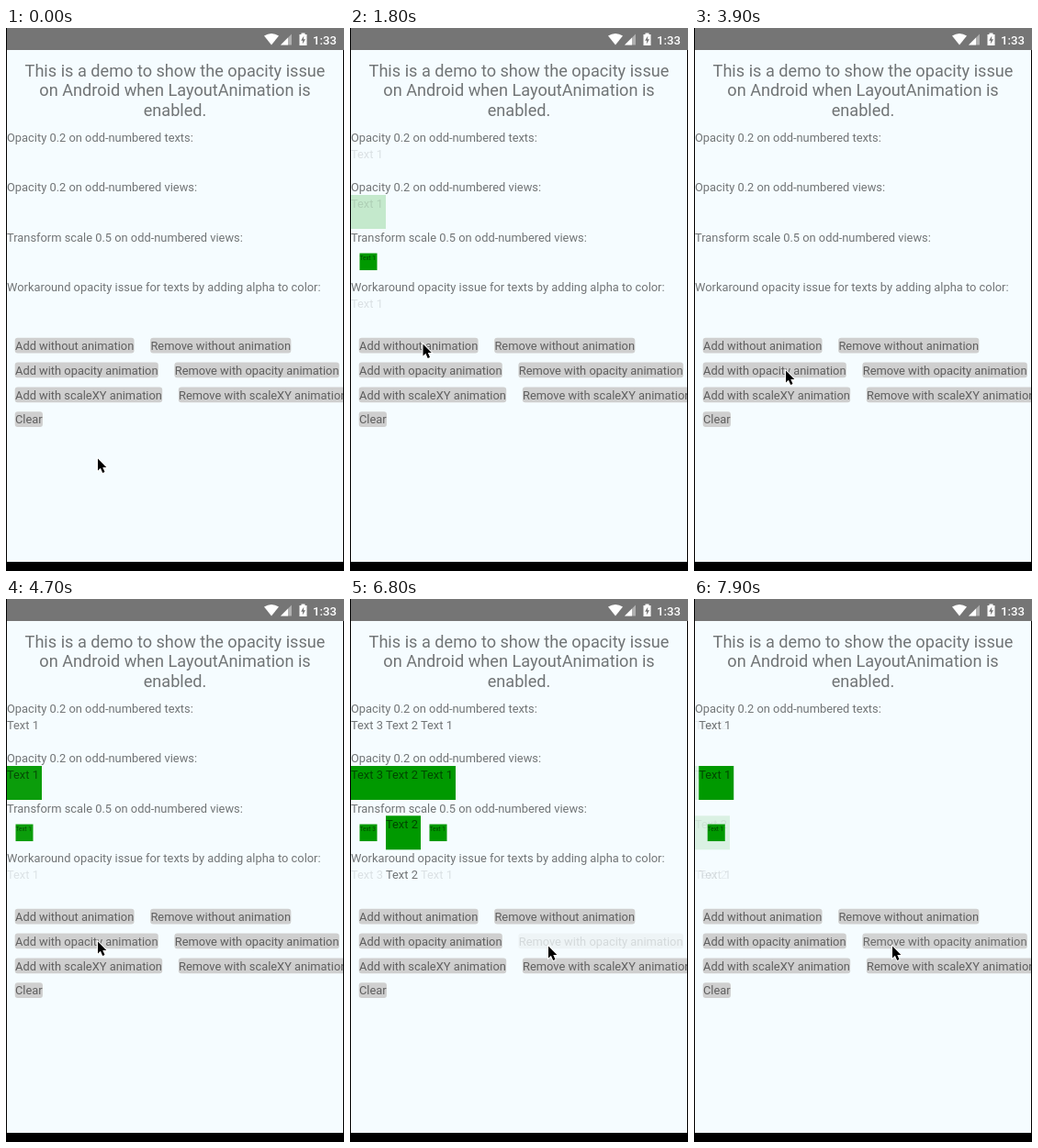
These frames come from a looping animation (368 px wide and 592 px high, 8000 ms). An HTML page with a canvas:

```html
<!DOCTYPE html>
<html lang="en">
<head>
<meta charset="utf-8">
<title>Opacity demo</title>
<style>
  html, body { margin: 0; width: 100%; height: 100%; overflow: hidden; background: #f5fcff; }
  canvas { display: block; width: 368px; height: 592px; }
</style>
</head>
<body>
<canvas></canvas>
<script>
const W = 368, H = 592, LOOP = 8000, STEP = 100, FADE = 300;
const INK = 'rgba(0,0,0,.54)', GREEN = '#009900', SLOT = 38;
const BODY = '12.86px Roboto, sans-serif';
const TITLE = '18.15px Roboto, sans-serif';
const CLOCK = '500 13.2px Roboto, sans-serif';

const canvas = document.querySelector('canvas');
const ctx = canvas.getContext('2d');
const ratio = window.devicePixelRatio || 1;
canvas.width = W * ratio;
canvas.height = H * ratio;

const titleLines = [
  'This is a demo to show the opacity issue',
  'on Android when LayoutAnimation is',
  'enabled.'
];
const labels = [
  'Opacity 0.2 on odd-numbered texts:',
  'Opacity 0.2 on odd-numbered views:',
  'Transform scale 0.5 on odd-numbered views:',
  'Workaround opacity issue for texts by adding alpha to color:'
];
const buttonRows = [
  ['Add without animation', 'Remove without animation'],
  ['Add with opacity animation', 'Remove with opacity animation'],
  ['Add with scaleXY animation', 'Remove with scaleXY animation'],
  ['Clear']
];

// Lifetimes in ms; faded items lose their own opacity.
const items = [
  { n: 3, born: 2250, died: 2650 },
  { n: 2, born: 1950, died: 3010 },
  { n: 1, born: 1350, died: 3300 },
  { n: 3, born: 6090, died: 7020, fade: true },
  { n: 2, born: 5190, died: 7665, fade: true },
  { n: 1, born: 4440, died: Infinity, fade: true }
];
const presses = [
  ['Add without animation', 1250, 1350],
  ['Add without animation', 1850, 1950],
  ['Add without animation', 2130, 2250],
  ['Remove without animation', 2500, 2650],
  ['Remove without animation', 2770, 2980],
  ['Remove without animation', 3150, 3300],
  ['Add with opacity animation', 4250, 4440],
  ['Add with opacity animation', 4860, 5190],
  ['Add with opacity animation', 5770, 6090],
  ['Remove with opacity animation', 6700, 7020],
  ['Remove with opacity animation', 7480, 7665]
];
// Pointer stops: [time, x, y]
const pointerPath = [
  [0, 99.5, 469], [200, 99.5, 469], [900, 79, 344], [2260, 79, 344],
  [2500, 189, 340], [3310, 189, 340], [3600, 99.5, 373],
  [6150, 99.5, 373], [6600, 215.5, 378], [LOOP, 215.5, 378]
];

const clamp = v => Math.min(1, Math.max(0, v));
const ease = v => (1 - Math.cos(Math.PI * clamp(v))) / 2;

function presence(item, t) {
  if (!item.fade) return t >= item.born && t < item.died ? 1 : 0;
  return ease((t - item.born) / FADE) * (1 - ease((t - item.died) / FADE));
}

function pressOpacity(name, t) {
  const last = presses.filter(p => p[0] === name && p[1] <= t).pop();
  if (!last) return 1;
  const [, down, up] = last;
  return t < up ? 1 - 0.8 * clamp((t - down) / 100) : 0.2 + 0.8 * ease((t - up) / FADE);
}

function text(str, x, y, font = BODY, color = INK, align = 'left') {
  ctx.font = font;
  ctx.fillStyle = color;
  ctx.textAlign = align;
  ctx.fillText(str, x, y);
}

function rect(x, y, w, h, color) {
  ctx.fillStyle = color;
  ctx.fillRect(x, y, w, h);
}

function shape(points, color) {
  ctx.fillStyle = color;
  ctx.beginPath();
  points.forEach(([x, y]) => ctx.lineTo(x, y));
  ctx.closePath();
  ctx.fill();
}

function statusBar() {
  rect(0, 0, W, 24, '#757575');
  ctx.fillStyle = '#fff';
  ctx.beginPath();
  ctx.moveTo(289, 18.5);
  ctx.lineTo(281, 8.6);
  ctx.quadraticCurveTo(289, 3.4, 297, 8.6);
  ctx.closePath();
  ctx.fill();
  shape([[299, 18.5], [311, 18.5], [311, 6.5]], '#b0b0b0');
  shape([[299, 18.5], [307, 18.5], [307, 10.5]], '#fff');
  rect(321.5, 5.5, 4, 2, '#fff');
  rect(319.5, 7, 8, 12, '#fff');
  shape([[324.3, 8.5], [321.2, 13.8], [323.2, 13.8], [322.8, 17.5], [326, 12.2], [324, 12.2]], '#757575');
  text('1:33', 360, 17.5, CLOCK, '#fff', 'right');
}

function box(label, x, y) {
  rect(x, y, SLOT, 37, GREEN);
  text(label, x, y + 14);
}

function drawItem(item, x, alpha) {
  const label = 'Text ' + item.n, odd = item.n % 2;
  const own = odd && !item.fade ? 0.2 : 1;
  ctx.globalAlpha = alpha * own;
  text(label, x, 142);
  box(label, x, 182);

  ctx.globalAlpha = alpha;
  ctx.save();
  if (odd) {
    ctx.translate(x + SLOT / 2, 254.8);
    ctx.scale(0.5, 0.5);
    ctx.translate(-x - SLOT / 2, -254.8);
  }
  box(label, x, 236.3);
  ctx.restore();

  ctx.globalAlpha = alpha * (odd ? 0.2 : 1);
  text(label, x, 305);
  ctx.globalAlpha = 1;
}

function drawItems(t) {
  const offset = {};
  for (const item of items) {
    const group = !!item.fade, p = presence(item, t), x = offset[group] || 0;
    if (p > 0) drawItem(item, 1 + x, p);
    offset[group] = x + p * SLOT;
  }
}

function drawButtons(t) {
  buttonRows.forEach((row, i) => {
    const y = 337.7 + i * 26.85;
    let x = 10;
    for (const name of row) {
      ctx.font = BODY;
      const w = ctx.measureText(name).width;
      ctx.globalAlpha = pressOpacity(name, t);
      ctx.fillStyle = '#cfcfcf';
      ctx.beginPath();
      ctx.roundRect(x - 0.3, y, w + 0.6, 16.8, 3);
      ctx.fill();
      text(name, x, Math.round(y + 13.2));
      x += w + 18.2;
    }
  });
  ctx.globalAlpha = 1;
}

function drawPointer(t) {
  const i = pointerPath.findIndex(p => p[0] > t);
  const [t0, x0, y0] = pointerPath[i - 1], [t1, x1, y1] = pointerPath[i];
  const k = ease((t - t0) / (t1 - t0));
  ctx.save();
  ctx.translate(x0 + (x1 - x0) * k, y0 + (y1 - y0) * k);
  const arrow = [[0.5, 0.5], [0.5, 13.5], [3.4, 10.8], [5.7, 16], [8, 15], [5.8, 10], [9.8, 10]];
  ctx.strokeStyle = '#fff';
  ctx.lineWidth = 1.8;
  shape(arrow, '#000');
  ctx.stroke();
  shape(arrow, '#000');
  ctx.restore();
}

function draw(t) {
  ctx.setTransform(ratio, 0, 0, ratio, 0, 0);
  rect(0, 0, W, H, '#f5fcff');
  statusBar();
  titleLines.forEach((line, i) => text(line, 184, 53 + i * 21.3, TITLE, INK, 'center'));

  // Lower labels drop out while an item fades away.
  const removing = items.some(m => m.fade && t > m.died && t < m.died + FADE);
  labels.forEach((label, i) => {
    if (!i || !removing) text(label, 1, Math.round(124 + i * 54.4));
  });
  drawItems(t);
  drawButtons(t);

  rect(0, 0, 1, H, '#000');
  rect(367, 24, 1, H, '#000');
  rect(0, 582, W, 10, '#000');
  drawPointer(t);
}

function tick() {
  const t = performance.now() % LOOP;
  draw(Math.floor(t / STEP) * STEP);
  requestAnimationFrame(tick);
}
tick();
</script>
</body>
</html>
```
